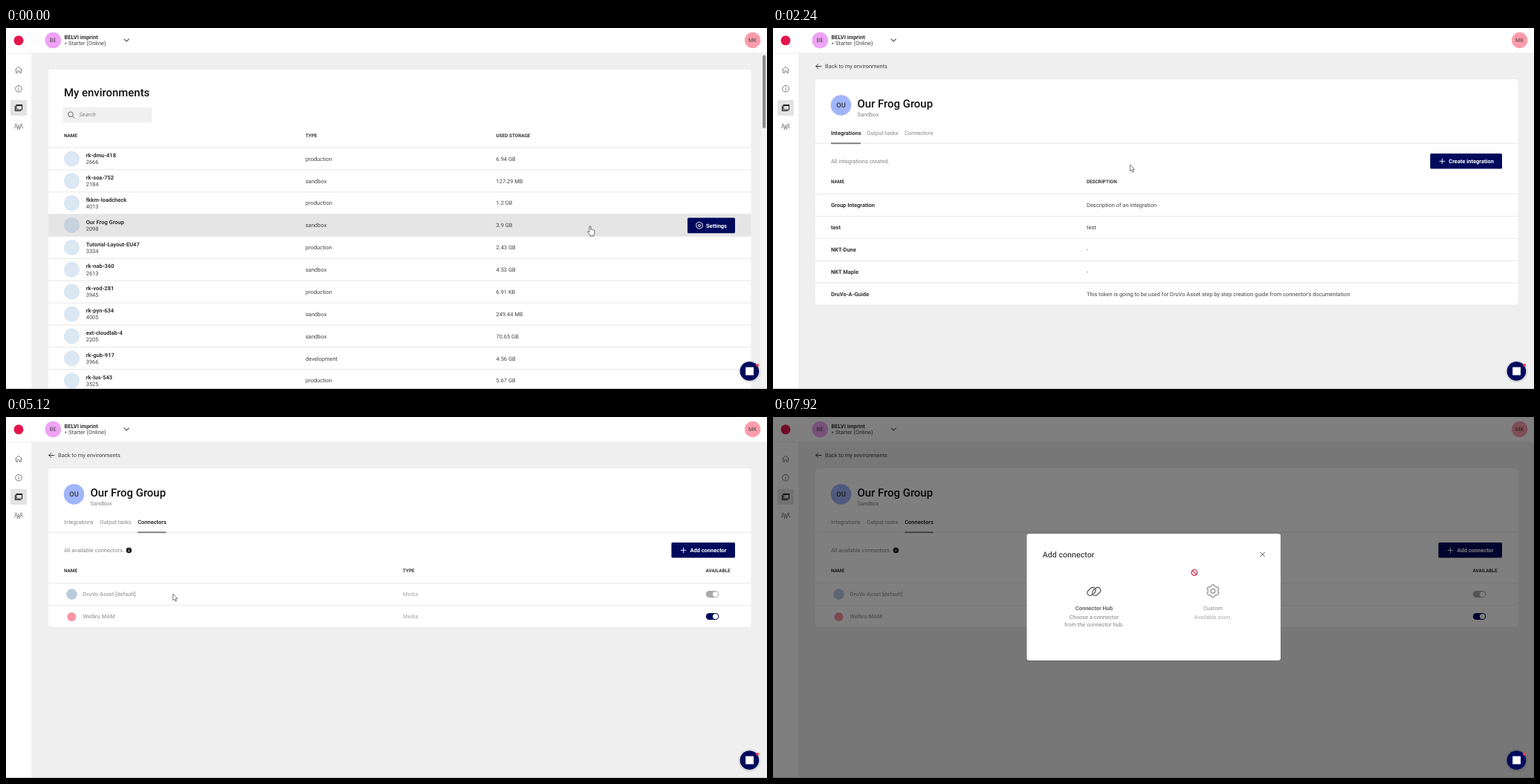
An HTML page that plays this animation: 1024 by 486 pixels, repeating every 8000 ms.

```html
<!DOCTYPE html>
<html lang="en">
<head>
<meta charset="utf-8">
<title>Environment settings</title>
<style>
  html, body { margin: 0; width: 100%; height: 100%; overflow: hidden; background: #efefef; }
  svg { display: block; width: 100%; height: 100%; }
  text { font-family: Roboto, "Open Sans", sans-serif; font-size: 7.47px; fill: #444; text-rendering: geometricPrecision; }
  .b { font-weight: 600; fill: #333; }
  .h { font-size: 6.4px; font-weight: 600; fill: #333; }
  .t { font-size: 14.93px; font-weight: 500; fill: #111; }
  .m { font-size: 10.67px; font-weight: 500; fill: #444; }
  .g { fill: #858585; }
  .w { font-weight: 600; fill: #fff; }
  .f { fill: #a8a8a8; }
  .fb { font-weight: 500; fill: #a2a2a2; }
  .c { text-anchor: middle; }
  .line { fill: none; stroke-linecap: round; stroke-linejoin: round; }
</style>
</head>
<body>
<svg id="stage" viewBox="0 0 1024 486" preserveAspectRatio="none" xmlns="http://www.w3.org/2000/svg"></svg>
<script>
const LOOP = 8000, STEP = 80, ROW = 29.87;
const NAVY = '#000a5c', HOVER = '#3b3d7d';

// Drawing helpers; text is placed by its vertical middle.
const text = (x, y, s, cls = '') => `<text x="${x}" y="${y + 2.7}" class="${cls}">${s}</text>`;
const rect = (x, y, w, h, fill, r = 0, more = '') =>
  `<rect x="${x}" y="${y}" width="${w}" height="${h}" rx="${r}" fill="${fill}" ${more}/>`;
const disc = (x, y, r, fill) => `<circle cx="${x}" cy="${y}" r="${r}" fill="${fill}"/>`;
const line = (d, color = '#444', w = 1) => `<path class="line" d="${d}" stroke="${color}" stroke-width="${w}"/>`;
const group = (id, body, more = '') => `<g id="${id}" ${more}>${body}</g>`;
const rule = y => rect(57, y - .6, 945.5, 1.2, '#ebebeb');
const rules = (y, n) => Array.from({ length: n }, (_, i) => rule(y + i * ROW)).join('');
const ring = (x, y, r, color, w) =>
  `<circle cx="${x}" cy="${y}" r="${r}" fill="none" stroke="${color}" stroke-width="${w}"/>`;

function gear(x, y, r, color, w) {
  const pts = Array.from({ length: 24 }, (_, i) => {
    const a = (i - .5) * Math.PI / 12, k = i % 4 < 2 ? r : r * .8;
    return `${(x + k * Math.sin(a)).toFixed(2)} ${(y - k * Math.cos(a)).toFixed(2)}`;
  });
  return line(`M${pts.join('L')}Z`, color, w) + ring(x, y, r * .34, color, w);
}

function button(id, x, label) {
  return rect(x, 169, 981 - x, 20.6, NAVY, 1.5, `id="${id}"`) +
    line(`M${x + 12.8} 179.4h6.6m-3.3 -3.3v6.6`, '#fff', .9) + text(x + 25, 179.4, label, 'w');
}

function topBar() {
  return rect(0, 0, 1024, 34, '#fff') + rect(0, 34, 35, 452, '#fff') +
    rect(0, 33.6, 1024, .8, '#e6e6e6') + rect(34.5, 34, .7, 452, '#e8e8e8') +
    disc(17, 16.8, 6.5, '#e4154b') +
    disc(63.3, 16.5, 10.8, '#efa2f6') + text(63.3, 16.5, 'BE', 'c') +
    text(78.5, 12, 'BELVI imprint', 'b') + disc(80.3, 20.7, 1.1, '#666') + text(84, 20.4, 'Starter (Online)') +
    line('M159 14.8l3.2 3.2l3.2 -3.2', '#555', 1.1) +
    disc(1004.7, 16.5, 10.7, '#fe9cab') + text(1004.7, 16.5, 'MK', 'c');
}

function sideBar() {
  const person = (x, y) => ring(x, y, 1.2, '#666', .8) + line(`M${x - 1.9} ${y + 4.4}q0 -2.2 1.9 -2.2t1.9 2.2`, '#666', .8);
  return rect(6, 97, 22, 21, '#e3e3e3', 1) +
    line('M12.6 56.2L17 52.2L21.4 56.2M13.6 55.6V60.4H15.7V57.8H18.3V60.4H20.4V55.6', '#666', .8) +
    ring(17, 81.8, 4.3, '#666', .85) + line('M17 81.5v2.4M17 79.6v.1', '#666', .9) +
    line('M14 103.6h7.6v6.4h-7.6zM14 104.4h7.6M12.4 105.4v6.1h7.4', '#222', 1.1) +
    person(13.4, 130.4) + person(20.6, 130.4) + person(17, 132.4);
}

function listPage() {
  const rows = [
    ['rk-dmu-418', 2666, 'production', '6.94 GB'],
    ['rk-soa-752', 2184, 'sandbox', '127.29 MB'],
    ['fkkm-loadcheck', 4013, 'production', '1.2 GB'],
    ['Our Frog Group', 2098, 'sandbox', '3.9 GB'],
    ['Tutorial-Layout-EU47', 3334, 'production', '2.43 GB'],
    ['rk-nab-360', 2613, 'sandbox', '4.53 GB'],
    ['rk-vod-281', 3945, 'production', '6.91 KB'],
    ['rk-pyn-634', 4005, 'sandbox', '249.44 MB'],
    ['ext-cloudlab-4', 2205, 'sandbox', '70.65 GB'],
    ['rk-gub-917', 3966, 'development', '4.56 GB'],
    ['rk-lus-543', 3525, 'production', '5.67 GB']
  ];
  const body = rows.map(([name, id, type, size], i) => {
    const y = 176 + i * ROW, over = i === 3;
    return (over ? rect(57, y - 14.6, 945.5, ROW - .4, '#e5e5e5') : '') +
      disc(88.5, y, 10.6, over ? '#c6d2dc' : '#dbe7f3') +
      text(107.7, y - 4.6, name, 'b') + text(107.7, y + 4.5, id) +
      text(403, y, type) + text(659.5, y, size);
  }).join('');
  return rect(57, 56, 945.5, 440, '#fff', 4) + text(78, 89, 'My environments', 't') +
    rect(76.5, 106.5, 119.5, 20.5, '#f0f0f0', 1) + ring(87, 116.2, 3.3, '#555', .9) + line('M89.5 118.8l2.6 2.6', '#555', .9) +
    `<text x="98.5" y="119.4" class="g" font-style="italic">Search</text>` +
    text(78, 143.8, 'NAME', 'h') + text(403, 143.8, 'TYPE', 'h') + text(659.5, 143.8, 'USED STORAGE', 'h') +
    rules(161, 11) + body +
    rect(917, 255.4, 64, 20.8, NAVY, 1.5, 'id="settings"') +
    line('M933 261.2l4.1 2.3v4.7l-4.1 2.3l-4.1 -2.3v-4.7z', '#fff', .9) + ring(933, 265.9, 1.5, '#fff', .9) +
    text(942, 265.9, 'Settings', 'w') +
    rect(1016.5, 34.5, 7.5, 451, '#f3f3f3') + rect(1018, 36.5, 4.3, 98.5, '#8c8c8c', 2);
}

function tabs(active) {
  const items = [['Integrations', 78, 40], ['Output tasks', 126.3, 42.5], ['Connectors', 177.2, 38.3]];
  return items.map(([s, x, w], i) => text(x, 141, s, i === active ? 'b' : 'g') +
    (i === active ? rect(x, 154.4, w, 1.8, '#777') : '')).join('');
}

function detailHead() {
  return line('M65 51.6H57.8M60.8 48.6l-3 3l3 3', '#333', 1) + text(70, 51.4, 'Back to my environments') +
    rect(57, 69, 945.5, 281.5, '#fff', 4, 'id="card"') +
    disc(91.5, 104, 13.8, '#a0b5fc') + `<text x="91.5" y="107.3" class="c" style="font-size:9.2px;font-weight:500;fill:#333">OU</text>` +
    text(113.5, 104.3, 'Our Frog Group', 't') + text(113.5, 116.5, 'Sandbox', 'g') + rule(155.2);
}

function skeleton(id, x2, label, over) {
  let s = text(78, 185, 'NAME', 'h') + text(x2, 185, label, 'h') + rules(202.6, 5);
  for (let i = 0; i < 5; i++) {
    const y = 217.2 + i * ROW;
    s += i === over ? rect(57, 262.3, 945.5, 29.6, '#e6e6e6')
      : rect(78, y - 4.3, 117.3, 8.6, '#e8e8e8', 1) + rect(x2, y - 4.3, 171, 8.6, '#e8e8e8', 1);
  }
  return group(id, s);
}

function integrations() {
  const rows = [
    ['Group Integration', 'Description of an integration'], ['test', 'test'], ['NKT-Dune', '-'], ['NKT Maple', '-'],
    ['DruVo-A-Guide', "This token is going to be used for DruVo Asset step by step creation guide from connector's documentation"]
  ];
  return rect(57, 0, 945.5, 29.6, '#e6e6e6', 0, 'id="over"') + text(78, 179.5, 'All integrations created.', 'g') +
    button('create', 884.3, 'Create integration') +
    text(78, 206.4, 'NAME', 'h') + text(422, 206.4, 'DESCRIPTION', 'h') + rules(223.6, 5) +
    rows.map(([a, b], i) => text(78, 238.6 + i * ROW, a, 'b') + text(422, 238.6 + i * ROW, b)).join('');
}

function connectors() {
  const toggle = (y, color) => rect(941.8, y - 4.6, 17.4, 9.2, color, 4.6) + disc(954.6, y, 3.6, '#fff');
  return text(78, 179.5, 'All available connectors.', 'g') +
    disc(165.4, 179.5, 3.7, '#111') + line('M165.4 179.3v1.9M165.4 177.5v.1', '#fff', .9) +
    button('add', 895.4, 'Add connector') +
    text(78, 206.4, 'NAME', 'h') + text(534, 206.4, 'TYPE', 'h') + text(941.5, 206.4, 'AVAILABLE', 'h') +
    rules(223.6, 2) +
    disc(88.5, 238.6, 7.3, '#b9cbdd') + text(103.5, 238.6, 'DruVo Asset [default]', 'fb') +
    disc(88.4, 268.9, 6, '#f796a4') + text(103.5, 268.5, 'Welbru MAM', 'fb') +
    text(534, 238.6, 'Media', 'f') + text(534, 268.5, 'Media', 'f') +
    toggle(238.6, '#a9a9a9') + toggle(268.5, NAVY);
}

function dialog() {
  const link = x => `<rect x="${x - 6.2}" y="231" width="12.4" height="7.8" rx="3.9" fill="none" stroke="#777" stroke-width="1.7" transform="rotate(-42 ${x} 234.9)"/>`;
  return rect(0, 0, 1024, 486, '#000', 0, 'opacity=".5"') +
    rect(341.5, 158, 341.5, 171, '#000', 3, 'opacity=".15"') + rect(341.5, 157.3, 341.5, 170.5, '#fff', 3) +
    text(362.7, 186.2, 'Add connector', 'm') + line('M655.9 182.3l5.6 5.6m0 -5.6l-5.6 5.6', '#555', 1) +
    link(428.6) + link(435.2) +
    text(432, 257.2, 'Connector Hub', 'b c" style="fill:#666') +
    text(432, 269.5, 'Choose a connector', 'g c') + text(432, 279, 'from the connector hub.', 'g c') +
    gear(592, 234.2, 8.4, '#a8a8a8', 1.7) +
    text(592, 256.8, 'Custom', 'fb c') + text(592, 268.8, 'Available soon.', 'f c');
}

function chat() {
  return disc(1000.5, 462.4, 16, 'url(#glow)') + disc(1000.4, 462, 12.8, NAVY) +
    rect(995.2, 456.6, 10.8, 10.8, '#fff') + disc(1011.2, 454, 2, '#f0404a');
}

const hand = `<path d="M-1 .8Q-1 -.2 0 -.2T1 .8V4.3Q2 3.6 2.6 4.6Q3.7 4 4.3 5.1Q5.9 4.7 5.9 6.4V8.6Q5.9 10.2 5 11.2V12.8H-.2V11.6L-3.1 8Q-3.6 6.9 -2.5 6.6Q-1.8 6.6 -1 7.5Z" fill="#fff" stroke="#444" stroke-width=".8"/>`;
const arrow = `<path d="M0 0V8.8L2 7L3.4 10.2L4.8 9.6L3.5 6.5H6.2Z" fill="#fff" stroke="#444" stroke-width=".7"/>`;
const stop = disc(0, 0, 4.2, '#fff') + ring(0, 0, 3.8, '#d2304c', 1.3) + line('M-2.6 -2.6L2.6 2.6', '#d2304c', 1.3);

const stage = document.getElementById('stage');
stage.innerHTML =
  `<defs><radialGradient id="glow"><stop offset=".7" stop-opacity=".2"/><stop offset="1" stop-opacity="0"/></radialGradient></defs>` +
  rect(0, 0, 1024, 486, '#efefef') +
  group('list', listPage()) +
  group('detail', detailHead() + group('tabA', tabs(0)) + group('tabC', tabs(2)) +
    skeleton('loadA', 422, 'DESCRIPTION', 2) + skeleton('loadC', 534, 'TYPE', -1) +
    group('dataA', integrations()) + group('dataC', connectors())) +
  topBar() + sideBar() + rect(0, 484.8, 1024, 1.2, '#cfcfcf') +
  group('dialog', dialog()) + chat() +
  group('cursor', group('hand', hand) + group('arrow', arrow) + group('stop', stop));

const el = {};
stage.querySelectorAll('[id]').forEach(n => el[n.id] = n);
const show = (id, on) => { el[id].style.display = on ? '' : 'none'; };

// Pointer path: time, x, y, easing into this point.
const linear = k => k, inOut = k => k * k * (3 - 2 * k), out = k => 1 - (1 - k) ** 2;
const path = [
  [0, 786, 267], [560, 936.5, 271, inOut], [1680, 936.5, 271],
  [2240, 480.5, 184, inOut], [2560, 152, 148, out], [2800, 147, 145, out], [3120, 147, 145],
  [3520, 203.5, 144, inOut], [4080, 203.5, 144], [4560, 88, 256, inOut], [4960, 171, 243, inOut],
  [5840, 787, 187, inOut], [6240, 901, 183, out], [7280, 901, 183], [7920, 567, 209.5, inOut], [LOOP, 567, 209.5]
];
function pointer(t) {
  const i = Math.max(1, path.findIndex(p => p[0] >= t));
  const [t0, x0, y0] = path[i - 1], [t1, x1, y1, ease = linear] = path[i];
  const k = ease((t - t0) / (t1 - t0));
  return [x0 + (x1 - x0) * k, y0 + (y1 - y0) * k];
}

function draw(t) {
  const [x, y] = pointer(t);
  const onList = t < 1040, loadA = !onList && t < 1760, tabC = t >= 3680;
  const loadC = tabC && t < 3840, open = t >= 6960;
  const dataA = t >= 1760 && !tabC, dataC = tabC && !loadC;
  const flags = { list: onList, detail: !onList, tabA: !tabC, tabC, loadA, loadC, dataA, dataC, dialog: open };
  for (const id in flags) show(id, flags[id]);

  el.card.setAttribute('height', (loadA || loadC ? 350.5 : dataC ? 282.5 : 372.3) - 69);
  const row = Math.floor((y - 223.6) / ROW);
  show('over', dataA && row >= 0);
  el.over.setAttribute('y', 223.8 + row * ROW);

  const onAdd = dataC && !open && x > 895 && y < 190;
  el.settings.setAttribute('fill', x > 917 ? HOVER : NAVY);
  el.add.setAttribute('fill', onAdd ? HOVER : NAVY);

  const onTab = t > 2240 && y < 155;
  const kind = open && x < 656 ? 'stop' : t < 1760 || onTab || onAdd ? 'hand' : 'arrow';
  for (const k of ['hand', 'arrow', 'stop']) show(k, k === kind);
  el.cursor.setAttribute('transform', `translate(${x.toFixed(2)} ${y.toFixed(2)})`);
}

const start = performance.now();
function tick() {
  const t = (performance.now() - start) % LOOP;
  draw(Math.floor(t / STEP) * STEP);
  requestAnimationFrame(tick);
}
draw(0);
requestAnimationFrame(tick);
</script>
</body>
</html>
```
